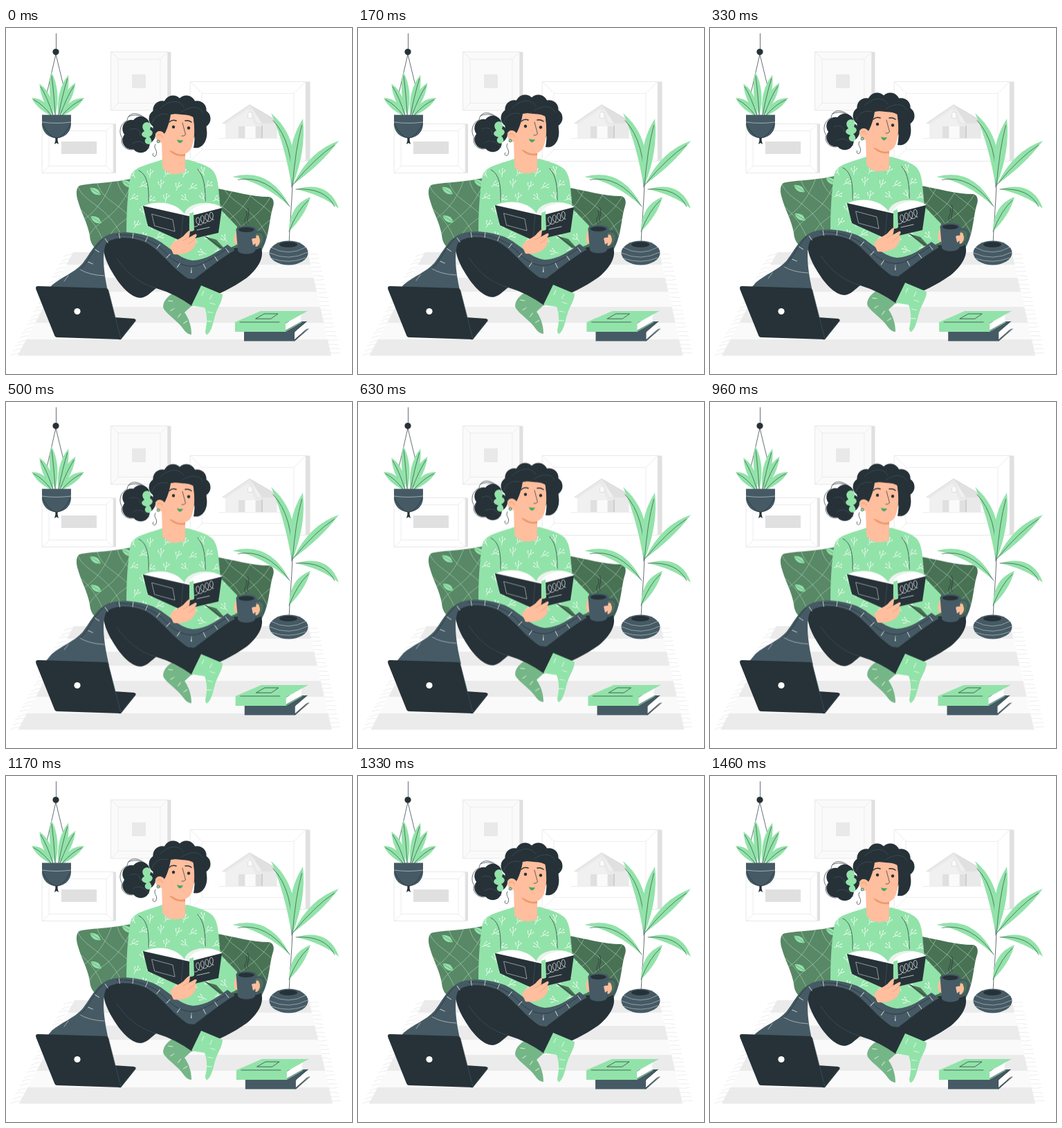
An HTML page for the animation above (1500 ms loop, 500 by 500 pixels).

```html
<!DOCTYPE html>
<html lang="en">
<head>
<meta charset="utf-8">
<title>Reading at home</title>
<style>
html, body { margin: 0; width: 100%; height: 100%; overflow: hidden; background: #fff; }
svg { display: block; width: 100vw; height: 100vh; }
path { stroke-linecap: round; stroke-linejoin: round; }
.g { fill: #92e3a9; }
.d { fill: #263238; }
.s { fill: #455a64; }
.k { fill: #ffbe9d; }
.w { fill: #fff; }
.ln { fill: none; stroke: #263238; stroke-width: .7; }
.wl { fill: none; stroke: #fff; stroke-width: .7; }
.sl { fill: none; stroke: #455a64; stroke-width: .6; }
.gl { fill: none; stroke: #e6e6e6; stroke-width: .7; }
.bold { stroke-width: 1.5; }
.stitch { fill: none; stroke: #fff; stroke-linecap: butt; opacity: .7; }
</style>
</head>
<body>
<svg viewBox="0 0 500 500" xmlns="http://www.w3.org/2000/svg">
  <defs>
    <clipPath id="inSweater"><use href="#sweater"/></clipPath>
    <clipPath id="inCushions"><use href="#cushionA"/><use href="#cushionB"/></clipPath>
  </defs>
  <g id="frames"></g>
  <g id="house">
    <path d="M317 136L352 112L392 136V159H317Z" fill="#f0f0f0"/>
    <path d="M313 138L352 111L363 137H391V159H369V141H360L351 117L317 139Z" fill="#e9e9e9"/>
    <path d="M352 111L397 137L370 138Z" fill="#e0e0e0"/>
    <path d="M313 137.500L352 111L397 137" fill="none" stroke="#d9d9d9"/>
    <path d="M336 142H345V159H336ZM361 142H369V159H361Z" fill="#e0e0e0"/>
    <path d="M346 142H360V159H346Z" fill="#fafafa"/>
    <path d="M369 141H371V159H369Z" fill="#cfcfcf"/>
    <path d="M349.500 130V124Q352.500 119 356 124V130Z" fill="#fafafa" stroke="#dcdcdc" stroke-width=".8"/>
    <path class="gl" d="M308 159.500H400"/>
  </g>
  <g id="fringe"></g>
  <g class="shake" id="rug"></g>

  <path class="ln" d="M72.500 8V31M72 38L55 112M72 38L90 112"/>
  <circle class="d" cx="72" cy="34.500" r="4.600"/>
  <g id="hanging"></g>
  <path class="d" d="M71 157H75L74.500 162L76 168L73 166L70 168L71.500 162Z"/>
  <path class="s" d="M52 125.500H94V138C94 151 84 159 73 159C62 159 52 151 52 138Z"/>
  <path class="wl" d="M52 136Q73 139 94 136" opacity=".7"/>
  <path class="ln" d="M53 139Q62 158 73 159Q84 158 93 139"/>

  <g class="float">
    <path id="cushionB" d="M300 231C330 236 355 244 380 244C386 245 388 251 386 258C380 276 381 302 369 322H290Z" fill="#497255"/>
    <path id="cushionA" d="M106 228C118 224 150 225 184 217L210 240V325H143C129 321 122 314 121 300C118 282 109 268 104 250C101 241 101 231 106 228Z" fill="#588865"/>
    <g clip-path="url(#inCushions)">
      <path id="weave" fill="none" stroke="#c4efd0" stroke-width=".6" opacity=".8"/>
      <g id="cushionLeaves"></g>
    </g>

    <!-- rear leg and sock -->
    <path d="M240 384C230 390 225 400 228 406C234 415 248 423 257 436Q262 443 268 443C268 432 265 421 258 411L270 400Z" fill="#75b687"/>
    <path class="stitch" stroke-width="7" stroke-dasharray="1 12" d="M238 394Q236 406 248 414T264 436"/>
    <path class="d" d="M258 366C285 350 308 332 330 318L368 316C373 326 370 343 348 361C327 376 306 385 290 392L262 384Z"/>

    <!-- sweater -->
    <path id="sweater" class="g" d="M226 190C243 192 253 191 262 190C275 194 292 198 299 206C308 217 307 236 310 262L334 287L332 314L318 320L292 340H235L174 297C174 265 176 235 180 214C184 200 208 197 226 190Z"/>
    <g id="sprigs" clip-path="url(#inSweater)"></g>
    <path class="ln" d="M192 206C203 211 207 226 206 252M277 204C287 215 288 232 288 250"/>
    <path d="M287 301L304 306L315 318L309 319Z" fill="#497255"/>
    <path class="ln" d="M288 301L313 319"/>

    <!-- front leg and sock -->
    <path class="d" d="M145 305C137 315 142 333 153 352C168 378 183 390 195 390C204 389 210 381 217 376Q244 384 269 402L284 373C258 358 240 337 222 317C202 300 163 295 145 305Z"/>
    <path class="sl" d="M160 333C180 362 200 371 217 376"/>
    <path class="g" d="M282 372L313 385C313 394 306 404 303 413C299 425 298 437 291 443Q288 443 288 438C291 426 291 414 287 404L268 401Z"/>
    <path class="stitch" stroke-width="8" stroke-dasharray="1 12" d="M284 383L301 391Q292 414 294 434"/>

    <!-- blanket -->
    <path class="s" d="M56 384L149 388C141 355 138 325 145 311C156 301 180 301 200 309C222 319 238 346 263 362L272 363C289 351 305 336 331 321L320 313C305 324 290 335 270 336C247 333 236 314 212 303C190 295 166 293 150 298C130 305 123 325 110 341C98 354 80 360 66 372Z"/>
    <path class="ln" d="M140 305C126 318 120 337 107 349M160 299C190 297 215 309 229 323C245 342 265 348 280 342C297 335 308 326 320 319"/>
    <path class="wl" d="M107 349Q120 357 142 358M90 358L84 366" opacity=".7"/>
    <path class="stitch" stroke-width="8" stroke-dasharray="1 19" d="M122 340C134 312 150 294 190 301C230 309 236 346 268 350C285 349 305 333 324 318"/>

    <!-- open book -->
    <path class="w" d="M199 257C222 248 247 253 258 269C265 253 291 247 312 259L309 272L265 276L202 264Z"/>
    <path d="M258 269C259 259 276 250 296 254C278 255 266 261 264 270Z" fill="#ebf3ed"/>
    <path class="d" d="M198 257L256 270L265 272L312 260L307 296L264 306L251 307L205 286Z"/>
    <path class="sl" d="M256 270L253 306M265 272L264 305"/>
    <path class="wl" d="M211 269L241 277L244 294L215 286Z" opacity=".7"/>
    <path class="wl" id="scribble"/>
    <path class="g" d="M265 268L271 266L272 292L268 295L265 292Z"/>

    <!-- hand on the book -->
    <path class="k" d="M237 316C241 307 251 306 257 300C263 293 267 290 268 294C268 298 264 301 264 303L273 298C277 297 276 301 273 304C276 307 275 313 270 319C263 327 250 328 242 327Z"/>
    <path d="M256 307L265 302M264 312L273 305" fill="none" stroke="#eb996e" stroke-width=".7"/>
    <path class="d" d="M266 294L275 293L272 298L265 301Z"/>

    <!-- neck and bun -->
    <path class="k" d="M225 160L226 202C233 211 246 215 259 207V178Z"/>
    <path d="M236 177C242 184 250 186 259 185V181Z" fill="#eb996e"/>
    <g id="bun" class="d"></g>
    <path class="ln" d="M204 133C190 119 176 122 175 134C165 138 162 151 168 159C164 170 176 179 186 175M177 128C188 123 201 127 207 139M213 181A2.500 2.500 0 1 0 217 183C220 177 212 174 216 168"/>
    <path class="sl" d="M179 147C187 143 195 147 194 155M183 167C191 161 200 165 207 174"/>
    <path class="g" d="M204 136C211 137 209 144 208 147C215 150 211 156 207 157C212 162 211 167 206 168C199 167 200 161 203 159C195 157 194 152 200 149C195 143 197 137 204 136Z"/>

    <!-- head -->
    <g id="hair" class="d"></g>
    <path class="k" d="M237 122C249 126 264 125 270 127C274 142 273 160 268 173C263 184 251 185 242 179C235 175 232 170 230 164C222 169 215 162 216 154C217 148 225 147 229 153C233 145 236 135 237 122Z"/>
    <path class="d" d="M214 148C220 144 226 146 230 151C234 143 237 133 238 125C249 123 262 124 271 129C272 143 274 158 271 173C285 176 294 160 289 142L266 106L230 109Z"/>
    <path class="sl" d="M223 116C239 101 253 106 257 114M254 121C267 112 280 113 284 122M211 137C214 126 226 122 234 125"/>
    <path d="M219 155Q224 151 226 158" fill="none" stroke="#eb996e" stroke-width=".9"/>
    <circle cx="220" cy="164" r="2" class="g" stroke="#263238" stroke-width=".6"/>
    <circle class="d" cx="242" cy="143" r="2.200"/>
    <circle class="d" cx="264" cy="144.500" r="2.200"/>
    <path class="ln bold" d="M236 136Q240 132 246 134M259 134Q264 133 268 136"/>
    <path class="ln" d="M255 137L259.500 154Q257 157 254 156"/>
    <path d="M247 161Q251 163 256 162Q254 167 250 166Q248 165 247 161Z" fill="#46a863"/>

    <!-- mug -->
    <path class="ln" d="M347 284C340 276 352 273 347 265M350 282C345 275 355 270 349 260"/>
    <path class="k" d="M336 293C329 295 328 305 331 312L337 315Z"/>
    <path d="M360 296C370 292 375 298 373 306C372 314 366 318 359 319" fill="none" stroke="#455a64" stroke-width="3.500"/>
    <path class="k" d="M356 302C362 298 366 299 366 303C368 307 367 313 362 316L356 315Z"/>
    <path class="s" d="M332.500 291H362L360 322C357 328 338 328 335 322Z"/>
    <ellipse cx="347.300" cy="291" rx="14.700" ry="5.200" class="s"/>
    <ellipse cx="347.300" cy="291.500" rx="11.500" ry="3.400" class="d"/>
    <path class="k" d="M355 305C361 302 365 305 364 309L357 314Z"/>
  </g>

  <path class="ln" d="M409 312C410 285 413 255 414 225"/>
  <g id="plant"></g>
  <ellipse class="s" cx="408.500" cy="325" rx="28" ry="17.500"/>
  <ellipse class="d" cx="408" cy="313" rx="13" ry="4"/>
  <path class="wl" d="M383 317Q408 331 433 317M381 325Q409 338 436 324M384 333Q409 342 433 332" opacity=".6"/>

  <g id="laptop">
    <path class="d" d="M155 418L185 420Q189 421 187 424L167 449Q166 451 163 450Z"/>
    <path class="d" d="M46 373L144 376Q147 376 148 379L166 450L74 447Q71 447 70 444L43.500 378Q42 373 46 373Z"/>
    <path class="sl" d="M148 379L166 449L186 424"/>
    <circle class="w" cx="103" cy="409.500" r="4.600"/>
  </g>

  <g class="shake">
    <path class="s" d="M344 438L377 424H435L417 439L420 441L437 434L417 452.500H344Z"/>
    <path class="w" d="M417 440L433 426Q430 431 434 435L417 450Z"/>
    <path class="ln" d="M417 452L437 435M417 439L434 424"/>
    <path class="g" d="M331 425L368 409H435L404 426V439H331Z"/>
    <path class="w" d="M404 427L428 413Q424 419 427 424L404 437Z"/>
    <path d="M404 438.500L427 425M404 426L435 409" fill="none" stroke="#92e3a9"/>
    <path class="ln" d="M338 425H395M361 420L373 413H393L383 420Z"/>
  </g>
</svg>
<script>
const $ = id => document.getElementById(id);
const add = (id, svg) => $(id).insertAdjacentHTML('beforeend', svg);
const each = (n, make) => Array.from({ length: n }, (_, i) => make(i)).join('');

let seed = 7;
const random = () => (seed = seed * 16807 % 2147483647) / 2147483647;

// Outer box, side depth, inset of the mat
function frame(x0, y0, x1, y1, depth, inset, fill) {
  const a = x0 + inset, b = y0 + inset, c = x1 - inset, d = y1 - inset;
  add('frames', `<path d="M${x1} ${y0}h${depth}V${y1}H${x1}Z" fill="#e0e0e0"/>
    <path d="M${x0} ${y0}H${x1}V${y1}H${x0}Z" fill="${fill}" stroke="#e8e8e8"/>
    <path class="gl" d="M${a} ${b}H${c}V${d}H${a}ZM${x0} ${y0}L${a} ${b}M${x1} ${y0}L${c} ${b}M${x1} ${y1}L${c} ${d}M${x0} ${y1}L${a} ${d}"/>`);
}
frame(152, 34.5, 233.5, 119, 5, 10.5, '#fafafa');
frame(266.5, 77.5, 433, 192.5, 6.5, 17, '#fff');
frame(52.5, 138.5, 155, 209.5, 4, 10, '#fff');
add('frames', '<path d="M182 67h20v20h-20Z" fill="#e9e9e9"/><path d="M80 164h51v18H80Z" fill="#e0e0e0"/>');

// Blade fullest past its middle; positive bend leans right of the growing direction
function leaf(id, x0, y0, x1, y1, width, bend, rib = '#263238') {
  const dx = x1 - x0, dy = y1 - y0, len = Math.hypot(dx, dy);
  const ctrl = k => `${x0 + dx * .55 - dy / len * k} ${y0 + dy * .55 + dx / len * k}`;
  add(id, `<path class="g" d="M${x0} ${y0}Q${ctrl(bend + width)} ${x1} ${y1}Q${ctrl(bend - width)} ${x0} ${y0}Z"/>
    <path d="M${x0} ${y0}Q${ctrl(bend)} ${x0 + dx * .9} ${y0 + dy * .9}" fill="none" stroke="${rib}" stroke-width=".6"/>`);
}

// Hanging fan: outer leaves are lower and lean outwards
for (const u of [-1, 1, -.7, .67, -.25, .4]) {
  leaf('hanging', 73 + 7 * u, 127, 75 + 38 * u, 61 + 40 * u * u, 11, -4 * u);
}

leaf('plant', 413, 230, 383, 123, 13, 20);
leaf('plant', 414, 228, 429, 131, 16, -4);
leaf('plant', 415, 226, 481, 163, 13, -6);
leaf('plant', 419, 233, 481, 261, 12, -20);
leaf('plant', 410, 258, 327, 215, 12, 26);
leaf('plant', 409, 294, 440, 244, 14, -6);

for (const [x, y] of [[121, 231], [122, 272], [167, 220]]) {
  leaf('cushionLeaves', x, y, x + 16, y + 10, 8, 0, '#588865');
}
$('weave').setAttribute('d', each(11, i => {
  const x = 70 + i * 30;
  return `M${x} 215c5 45 50 30 75 105M${x + 15} 320c5-50 45-30 70-105`;
}));

// Curls: equal circles around an ellipse, with a filled middle
function curls(id, cx, cy, rx, ry, r, n) {
  add(id, `<ellipse cx="${cx}" cy="${cy}" rx="${rx}" ry="${ry}"/>` + each(n, i => {
    const a = i / n * 2 * Math.PI;
    return `<circle cx="${cx + rx * Math.cos(a)}" cy="${cy + ry * Math.sin(a)}" r="${r}"/>`;
  }));
}
curls('bun', 191, 154, 12, 14, 13, 5);
curls('hair', 251, 131, 31, 21, 13.5, 10);

// Sprigs on a staggered, jittered grid
const jitter = size => (random() - .5) * size;
add('sprigs', each(42, i => {
  const row = Math.floor(i / 6), x = 186 + i % 6 * 24 + row % 2 * 12, y = 208 + row * 19;
  return `<g transform="translate(${x + jitter(6)} ${y + jitter(6)}) rotate(${jitter(150)})">
    <path class="wl" d="M0 7Q1 0 0-5M0 3Q-4 2-4-2M.5 1Q4 0 4-3"/>
    <path class="wl bold" d="M0-5v0M-4-2v0M4-3v0"/></g>`;
}));

// Handwritten loops climbing across the cover
$('scribble').setAttribute('d', 'M272 287' + each(80, i => {
  const u = i / 79, a = u * 8 * Math.PI;
  return `L${274 + 26 * u + 4 * Math.sin(a)} ${281 - 10 * u + 6 * Math.cos(a)}`;
}) + 'M276 292L294 288');

// Rug: sides run from (97,324)-(436,324) to (17,473)-(470,473)
const left = y => 97 - (y - 324) * 80 / 149;
const right = y => 436 + (y - 324) * 34 / 149;
const edge = i => 324 + 17.3 * i + .62 * i * i;
add('rug', each(7, i => {
  const y0 = edge(i), y1 = Math.min(edge(i + 1), 473.5);
  return `<path d="M${left(y0)} ${y0}H${right(y0)}L${right(y1)} ${y1}H${left(y1)}Z" fill="${i % 2 ? '#fafafa' : '#ebebeb'}"/>`;
}));
add('fringe', `<path class="gl" d="${each(24, i => {
  const y = 327 + i * 6.2, sway = Math.sin(i * 2.3);
  return `M${left(y)} ${y}q-6 ${sway}-12 ${3 + sway}M${right(y)} ${y}q7 ${sway} 14 ${-sway}`;
})}"/>`);

function loop(selector, easing, moves) {
  const keys = moves.map(([x, y]) => ({ easing, transform: `translate(${x}px, ${y}px)` }));
  document.querySelectorAll(selector).forEach(el =>
    el.animate(keys, { duration: 1500, iterations: Infinity }));
}
const swing = [0, -1, 2, -4, 4];
loop('.float', 'ease-in-out', [[0, 0], [0, -10], [0, 0]]);
loop('.shake', 'ease', [...swing, -4, ...swing.reverse()].map(x => [x, 0]));
</script>
</body>
</html>
```
